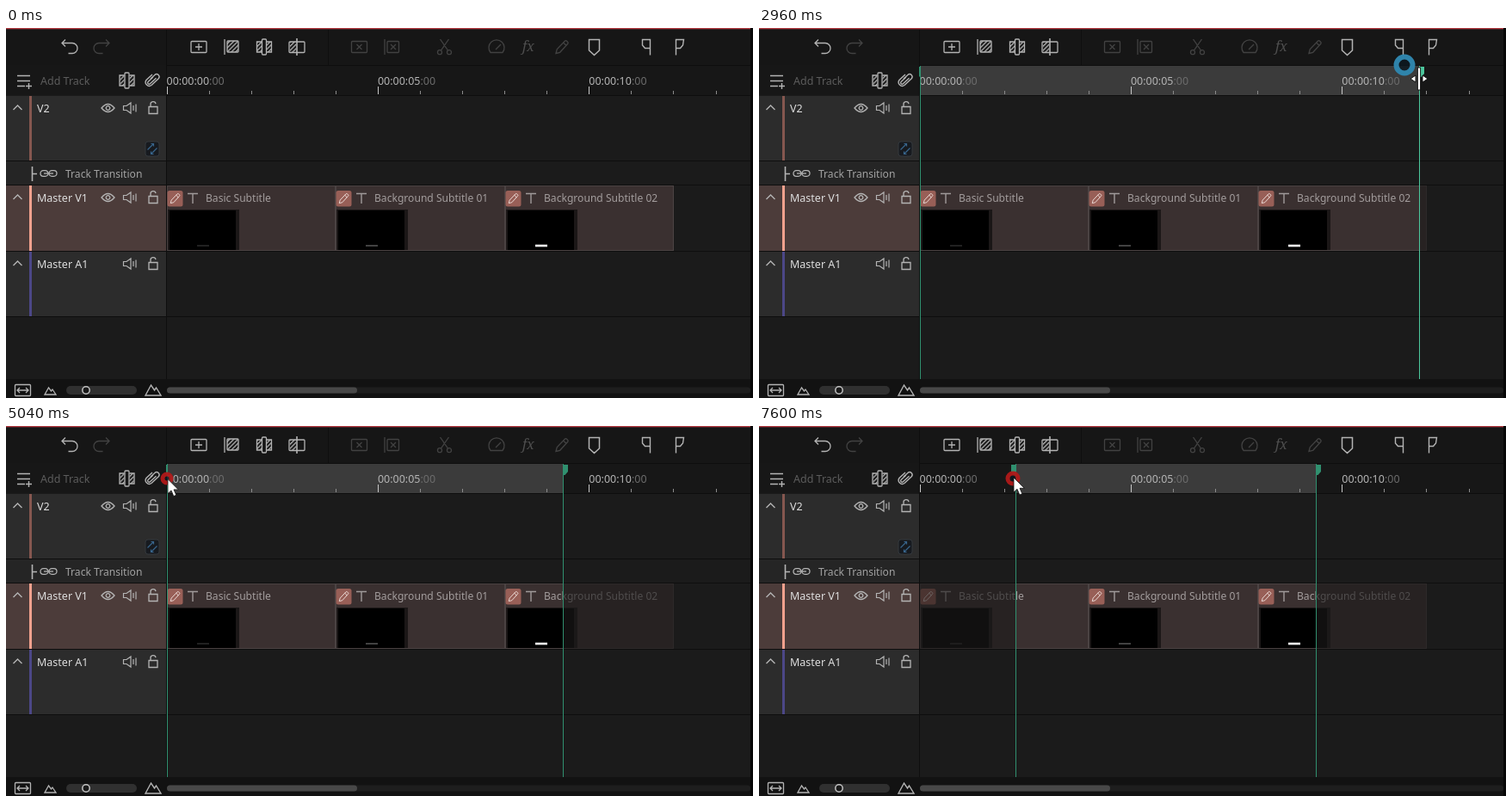
Recreate the animation shown at these times as an HTML page. Size 868 by 430 pixels, loop 7.76 s.

```html
<!DOCTYPE html>
<html lang="en">
<head>
<meta charset="utf-8">
<title>Timeline range</title>
<style>
html, body { margin: 0; width: 100%; height: 100%; overflow: hidden; background: #1b1b1b; }
svg { display: block; width: 868px; height: 430px; }
text { font-family: "Noto Sans", "Open Sans", sans-serif; white-space: pre; }
</style>
</head>
<body>
<svg id="stage" viewBox="0 0 868 430"></svg>
<script>
const LOOP = 7760, STEP = 80;
const LIGHT = '#b4b4b4', DIM = '#424242';
const stage = document.getElementById('stage');

// Markup helpers
const rect = (x, y, w, h, fill, more = '') =>
  `<rect x="${x}" y="${y}" width="${w}" height="${h}" fill="${fill}" ${more}/>`;
const box = (x, y, w, h, c = LIGHT, more = '') =>
  rect(x, y, w, h, 'none', `stroke="${c}" stroke-width="1.3" rx="1" ${more}`);
const line = (d, c = LIGHT, w = 1.3, more = '') =>
  `<path d="${d}" fill="none" stroke="${c}" stroke-width="${w}" ${more}/>`;
const shape = (d, fill, more = '') => `<path d="${d}" fill="${fill}" ${more}/>`;
const text = (x, y, s, c, size = 12.5) =>
  `<text x="${x}" y="${y}" fill="${c}" font-size="${size}">${s}</text>`;
const at = (x, y, s) => `<g transform="translate(${x} ${y})">${s}</g>`;

const pencil = c => line('M-7 7.5l1.2-4.7L3.3-6.8a1.6 1.6 0 0 1 2.3 0l1 1a1.6 1.6 0 0 1 0 2.3L-2.3 6.3zM1.6-5l3.3 3.3', c);
const hatch = (x, y, w, h) => rect(x, y, w, h, 'url(#hatch)');
const undo = 'M-5-8.5l-4 4l4 4M-8.5-4.5H3a6 6 0 0 1 0 12H-1.5';

// Clip outline with a tall bar across its middle
const trimIcon = line('M-3-6H-8.5V6H-3M3-6H8.5V6H3') + hatch(-8, -6, 5, 12) + hatch(3, -6, 5, 12) +
  box(-2.5, -9, 5, 18);
const splitIcon = box(-9, -6, 18, 12.5) + hatch(-8, -6, 7, 12) + line('M0-10V10', LIGHT, 1.6);

function toolbar() {
  return rect(0, 0, 868, 43, '#161616') + rect(0, 0, 865, 1.3, '#b53b42') +
    rect(186, 2, 1, 41, '#0e0e0e') + rect(374, 2, 1, 41, '#0e0e0e') +
    at(74, 22, line(undo)) +
    at(111, 22, `<g transform="scale(-1 1)">${line(undo, DIM)}</g>`) +
    at(224, 22, box(-9, -6.5, 18, 13) + line('M-4 0H4M0-4V4')) +
    at(262, 22, line('M-8-9V9') + box(-5, -7, 13, 13) + hatch(-5, -7, 13, 13)) +
    at(300, 22, trimIcon) + at(338, 22, splitIcon) +
    at(410.5, 22, box(-9, -6.5, 18, 13, DIM) + line('M-3-3L3 3M3-3L-3 3', DIM)) +
    at(448, 22, line('M-8-9V9', DIM) + box(-5, -6.5, 13.5, 13, DIM) + line('M-1-3L5 3M5-3L-1 3', DIM)) +
    at(509.5, 22, line('M-5-9L4 4M5-9L-4 4M-8 6.2a2.5 2.5 0 1 0 5 0a2.5 2.5 0 1 0-5 0M3 6.2a2.5 2.5 0 1 0 5 0a2.5 2.5 0 1 0-5 0', DIM)) +
    at(570, 22, line('M-7 6.5A9 9 0 1 1 7 6.5zM-1 3L5-3', DIM)) +
    `<text x="600" y="27" fill="#4e4e4e" font-size="16" font-style="italic" style="font-family:'Noto Serif',serif">fx</text>` +
    at(646, 22, pencil(DIM)) +
    at(683.5, 22, line('M-6-8.5H6V4L0 9.5L-6 4z', LIGHT, 1.5)) +
    at(744, 22, line('M4.5 9.5V-8.5H-4.5V-2L-1.5 1.5H4.5', LIGHT, 1.4)) +
    at(782, 22, line('M-3.5 9.5V-8.5H5.5L4.5-2L1.5 1.5H-3.5', LIGHT, 1.4));
}

function header() {
  return rect(0, 43, 187, 35, '#171717') +
    line('M13 55.5H28M13 61.5H28M13 67.5H22M23 67.5h7M26.5 64v7', LIGHT, 1.4) +
    text(40, 66, 'Add Track', '#5c5c5c') +
    at(140.5, 61, trimIcon) +
    at(170, 61, line('M-2-2L3.2-6.8a3.1 3.1 0 0 1 4.3 4.3L-1 5.5a4.3 4.3 0 0 1-6-6L0-7M4.5-2.8L-2.6 3.7a1.6 1.6 0 0 1-2.3-2.3L1-4', LIGHT, 1.4));
}

const eye = line('M-7.5 0Q0-9 7.5 0Q0 9-7.5 0zM-2.3 0a2.3 2.3 0 1 0 4.6 0a2.3 2.3 0 1 0-4.6 0');
const speaker = line('M-7.5-2.5h3.5L1-6V6L-4 2.5h-3.5zM4-3v6M7-4.5v9', LIGHT, 1.2);
const lock = line('M-5-1.5h10v8h-10zM-3-1.5v-2.5a3 3 0 0 1 6-.8', LIGHT, 1.3);

function trackHead(y, h, name, bg, bar, hasEye) {
  const mid = y + 14;
  return rect(0, y, 186, h, bg) + rect(27, y, 3, h, bar) +
    line(`M8.5 ${mid + 2}l5-5l5 5`, LIGHT, 1.4) +
    text(36, mid + 5, name, '#dedede') +
    (hasEye ? at(118.5, mid, eye) : '') + at(144, mid, speaker) + at(171, mid, lock);
}

function tracks() {
  let s = rect(0, 78, 187, 330, '#1b1b1b');
  s += trackHead(79, 75, 'V2', '#2c2c2c', '#85574f', true);
  s += rect(162, 132, 16, 17, '#171a1f', 'rx="3" stroke="#34383d"') +
    line('M164.5 141.5l7-7M168.5 134.5h3v3M175.5 139.5l-7 7M171.5 146.5h-3v-3', '#38658c', 1.2);
  s += rect(0, 155, 186, 27, '#252525') + line('M30.5 161v17M31 169.5h5', LIGHT, 1.6) +
    at(49, 169, box(-9, -3.3, 9, 6.6, LIGHT, 'style="rx:3.3px"') + box(1, -3.3, 9, 6.6, LIGHT, 'style="rx:3.3px"') + line('M-5 0H6')) +
    text(69, 174, 'Track Transition', '#a2a2a2', 12.1);
  s += trackHead(183, 76, 'Master V1', '#4c3c3a', '#f3a18e', true);
  s += trackHead(260, 75, 'Master A1', '#2c2c2c', '#4c4787', false);
  for (const y of [154, 182, 259, 335]) s += rect(0, y, 865, 1, '#0e0e0e');
  return s + rect(186, 43, 1, 365, '#0e0e0e');
}

function ruler() {
  let s = '';
  for (let i = 0; i < 14; i++) {
    const major = i % 5 === 0, x = 187 + i * 49.08;
    s += rect(Math.floor(x), major ? 68 : 73, 1, major ? 9 : 4, major ? '#c8c8c8' : '#8c8c8c');
  }
  ['00:00:00', '00:00:05', '00:00:10'].forEach((t, i) => {
    s += text(186.5 + i * 245.4, 66, `${t}<tspan fill="#6c6c6c">:00</tspan>`, '#b4b4b4', 12.5);
  });
  return s;
}

function clip(x, w, name, mark, thick) {
  return rect(x + .5, 183.5, w - 1, 75, '#3a3030', 'stroke="#4b4343"') +
    rect(x + .5, 189, 18, 18.5, '#985f57', 'rx="2.5"') +
    at(x + 9.5, 198, `<g transform="scale(.75)">${pencil('#ecdad6')}</g>`) +
    line(`M${x + 24} 192.5h12M${x + 30} 192.5v11.5`, '#a09a9a', 1.4) +
    text(x + 45, 202, name, '#a39d9d', 12.1) +
    rect(x + 1, 211, 83, 47, '#1b1717') + rect(x + 3, 212, 77, 46, '#000') +
    rect(x + 35, 253 - thick / 2, 14, thick, mark);
}

function footer() {
  return rect(0, 408, 868, 22, '#121212') +
    box(10.5, 414.5, 18, 13) +
    line('M13 421h13M16 418l-3 3l3 3M23 418l3 3l-3 3') +
    line('M45 426l4.5-8l3 4l1.5-2l4 6z') +
    rect(70, 416, 82, 10, '#303030', 'rx="5"') +
    '<circle cx="93" cy="421" r="4.2" fill="#1a1a1a" stroke="#c4c4c4" stroke-width="1.5"/>' +
    line('M162 427l6.5-12l4 6l2-3l5.5 9z', LIGHT, 1.4) +
    rect(187, 417.5, 678, 7, '#1e1e1e', 'rx="3.5"') + rect(187, 417.5, 221, 7, '#484848', 'rx="3.5"');
}

stage.innerHTML = `<defs>
  <pattern id="hatch" width="3.4" height="3.4" patternUnits="userSpaceOnUse" patternTransform="rotate(45)">
    <rect width="1.3" height="3.4" fill="${LIGHT}"/></pattern>
  <radialGradient id="glow"><stop stop-color="#12485c" stop-opacity=".75"/><stop offset=".45" stop-color="#2189ad" stop-opacity=".85"/>
    <stop offset=".68" stop-color="#39b4dd" stop-opacity=".95"/><stop offset="1" stop-color="#1c7fa6" stop-opacity="0"/></radialGradient>
  <clipPath id="lanes"><rect x="186" y="43" width="679" height="365"/></clipPath>
</defs>` +
  rect(0, 0, 868, 430, '#1b1b1b') + toolbar() +
  rect(187, 43, 678, 35, '#171717') + rect(0, 43, 868, 1, '#0e0e0e') +
  rect(187, 44, 0, 34, '#3b3b3b', 'id="range"') + ruler() +
  header() + tracks() + rect(187, 78, 678, 1, '#0e0e0e') +
  clip(187, 196, 'Basic Subtitle', '#2c2c2c', 1.5) +
  clip(383, 197, 'Background Subtitle 01', '#4a4a4a', 1.8) +
  clip(580, 196, 'Background Subtitle 02', '#f2f2f2', 2.6) +
  rect(187, 183, 0, 76, '#1c1b1b', 'id="shadeIn" opacity=".62"') +
  rect(776, 183, 0, 76, '#1c1b1b', 'id="shadeOut" opacity=".62"') +
  footer() + rect(865, 0, 3, 430, '#070707') +
  `<g id="marks" clip-path="url(#lanes)">
    <g id="markIn">${shape('M1 45H-5V53L-2 56.5H1z', 'currentColor')}${rect(0, 44, 1, 364, 'currentColor')}</g>
    <g id="markOut">${shape('M0 45H6V53L2.5 57H0z', 'currentColor')}${rect(0, 44, 1, 364, 'currentColor')}</g>
  </g>
  <circle id="glowDot" fill="url(#glow)"/>
  <circle id="ring" fill="#0b1820" fill-opacity=".8"/>
  <g id="arrow">${shape('M0 0V17L4 13.3L6.8 20L9.8 18.7L7 12.3H12.3z', '#fff', 'stroke="#111" stroke-width=".8"')}</g>
  <g id="resize">${shape('M-1.6-13H1.6V13H-1.6zM-4-4V4L-10 0zM4-4V4L10 0z', '#fff', 'stroke="#0a0a0a" stroke-width=".9"')}</g>`;

const el = {};
stage.querySelectorAll('[id]').forEach(n => el[n.id] = n);

// Rows of [time, ...values], linear in between
const pointer = [[320, 560, 297], [1040, 733, 124], [1360, 783.5, 18], [2000, 783.5, 18], [2400, 776, 58],
  [2640, 776, 58], [2960, 767, 59], [3360, 733, 57], [3600, 690, 55], [3840, 649, 55], [4080, 649, 55],
  [4160, 634, 56], [4400, 505, 60], [4720, 270, 63], [4960, 188, 62], [5360, 188, 60],
  [5600, 212, 60], [5920, 262, 60], [6160, 292, 60], [6240, 296, 60]];
const outAt = [[2640, 776], [2960, 767], [3360, 733], [3600, 689], [3840, 647]];
const inAt = [[5360, 187], [5600, 212], [5920, 262], [6160, 293], [6240, 298]];
const glowSize = [[1440, 0, 1], [1520, 9, 1], [1680, 14, 1], [1760, 17, .7], [1920, 17, 0]];
// Rows of [time, radius, stroke, opacity]
const ringSize = [[2560, 3, 3, 0], [2640, 6, 4, 1], [2880, 9.5, 6, 1], [2960, 9.5, 6, 1], [3120, 6, 4, 1], [3920, 6, 4, 1],
  [4080, 12, 3, 0], [5040, 3, 3, 0], [5120, 9, 6, 1], [5200, 6, 4, 1], [6480, 6, 4, 1], [6640, 13, 4, .6], [6720, 14, 3, 0]];

function sample(rows, t) {
  if (t <= rows[0][0]) return rows[0].slice(1);
  const i = rows.findIndex(r => r[0] >= t);
  if (i < 0) return rows[rows.length - 1].slice(1);
  const a = rows[i - 1], b = rows[i], k = (t - a[0]) / (b[0] - a[0]);
  return a.slice(1).map((v, j) => v + (b[j + 1] - v) * k);
}
const set = (n, props) => { for (const p in props) n.setAttribute(p, props[p]); };
const show = (n, on) => set(n, { visibility: on ? 'visible' : 'hidden' });
const within = (t, a, b) => t >= a && t < b;

function draw(t) {
  const [x, y] = sample(pointer, t);
  const a = Math.round(sample(inAt, t)[0]), b = Math.round(sample(outAt, t)[0]);
  const ranged = t >= 1600;
  const holdOut = within(t, 2400, 4080), holdIn = within(t, 5120, 6640);
  const sizing = holdOut || holdIn;

  for (const n of [el.range, el.marks, el.shadeIn, el.shadeOut]) show(n, ranged);
  set(el.range, { x: a, width: b - a });
  set(el.shadeIn, { width: Math.max(0, a - 187) });
  set(el.shadeOut, { x: b, width: Math.max(0, 776 - b) });
  set(el.markIn, { transform: `translate(${a} 0)`, color: holdIn ? '#4cc79d' : '#30906f' });
  set(el.markOut, { transform: `translate(${b} 0)`, color: holdOut ? '#4cc79d' : '#30906f' });

  const [gr, go] = sample(glowSize, t);
  set(el.glowDot, { cx: 783, cy: 18, r: gr, opacity: go });

  const red = within(t, 5040, 5120) ? [187, 61, 5, 5] :
    t >= 7600 ? [295, 61, 6, 5] : t >= 7520 ? [295, 61, 4, 4] : null;
  const [rr, rw, ro] = sample(ringSize, t);
  set(el.ring, red
    ? { cx: red[0], cy: red[1], r: red[2], 'stroke-width': red[3], stroke: '#b01a1a', opacity: .95 }
    : { cx: x - 17, cy: y - 16, r: rr, 'stroke-width': rw, stroke: '#2f84ab', opacity: ro });

  show(el.arrow, t >= 320 && !sizing);
  show(el.resize, sizing);
  set(el.arrow, { transform: `translate(${x} ${y})`, opacity: Math.min(1, (t - 240) / 240) });
  set(el.resize, { transform: `translate(${x} ${y})` });
}

const start = performance.now();
function tick() {
  const t = (performance.now() - start) % LOOP;
  draw(Math.min(7600, Math.floor(t / STEP) * STEP));
  requestAnimationFrame(tick);
}
tick();
</script>
</body>
</html>
```
